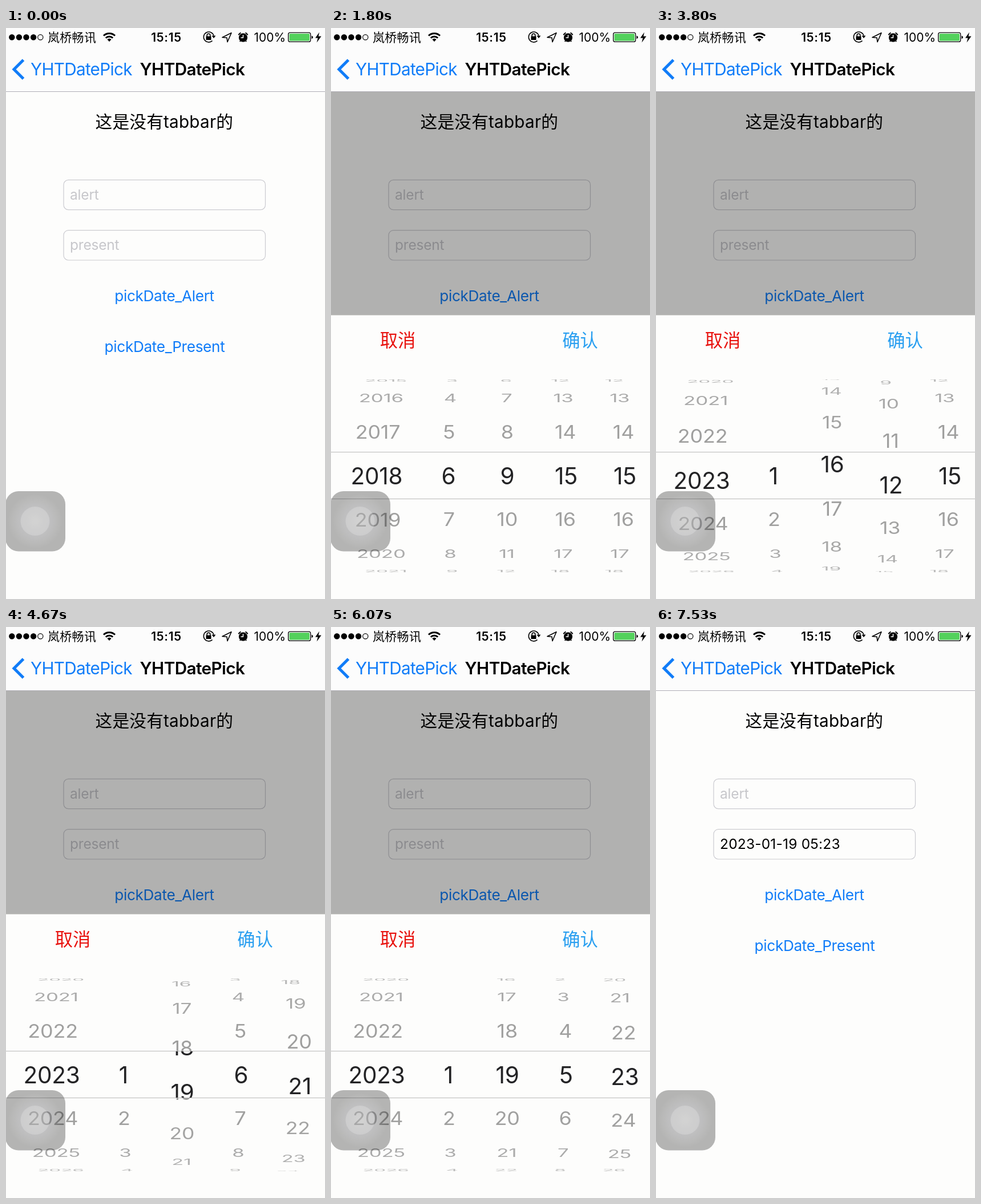
An HTML page for the animation above (7590 ms loop, 559 by 1001 pixels).

```html
<!DOCTYPE html>
<html lang="zh">
<head>
<meta charset="utf-8">
<title>Date picker</title>
<style>
  html, body { margin: 0; width: 100%; height: 100%; overflow: hidden; background: #fdfdfc; }
  svg { display: block; width: 100vw; height: 100vh; }
  text { font-family: Inter, "Noto Sans CJK SC", "Noto Sans CJK", sans-serif; white-space: pre; }
  .mid { text-anchor: middle; }
  .status { font-size: 21px; }
  .nav { font-size: 29.7px; letter-spacing: -.024em; }
  .title { font-weight: 600; letter-spacing: -.02em; }
  .field { font-size: 24.5px; letter-spacing: .008em; }
  .hint { fill: #c7c7cb; letter-spacing: -.008em; }
  .link { font-size: 26.2px; letter-spacing: -.013em; fill: #107cf8; }
  .act { font-size: 31.3px; }
  .box { fill: none; stroke: #cbcbd0; stroke-width: 1.2; }
  .row { text-anchor: middle; font-size: 40.5px; letter-spacing: -.005em; }
  .line { fill: none; stroke: #000; }
</style>
</head>
<body>
<svg viewBox="0 0 559 1001">
  <defs>
    <clipPath id="wheelClip"><path d="M0-172H559V-41H0ZM0 41H559V172H0Z"/></clipPath>
    <clipPath id="bandClip"><path d="M0-41H559V41H0Z"/></clipPath>
    <radialGradient id="glow">
      <stop offset="0" stop-color="#fff" stop-opacity=".26"/>
      <stop offset=".6" stop-color="#f4f4ff" stop-opacity=".16"/>
      <stop offset="1" stop-color="#fff" stop-opacity="0"/>
    </radialGradient>
  </defs>
  <rect width="559" height="1001" fill="#fdfdfc"/>

  <text x="156.5" y="175" font-size="29.7" letter-spacing=".2">这是没有tabbar的</text>
  <rect class="box" x="101" y="266.3" width="353.5" height="52.4" rx="8.5"/>
  <rect class="box" x="101" y="354.6" width="353.5" height="52.4" rx="8.5"/>
  <text class="field hint" x="112" y="301">alert</text>
  <text class="field hint" x="112" y="389" id="present">present</text>
  <text class="link mid" x="277.5" y="479">pickDate_Alert</text>
  <text class="link mid" x="278" y="568">pickDate_Present</text>

  <rect id="dim" y="112" width="559" height="889"/>

  <g id="panel">
    <rect width="559" height="498" fill="#fdfdfc"/>
    <text class="act mid" x="117" y="55.5" fill="#e8130f">取消</text>
    <text class="act mid" x="436.5" y="55.5" fill="#2a9ff0">确认</text>
    <g transform="translate(0 281.5)">
      <g id="rim" clip-path="url(#wheelClip)"></g>
      <g id="band" clip-path="url(#bandClip)"></g>
      <path d="M0-41.5H559M0 40.5H559" stroke="#b9b9b9"/>
    </g>
  </g>

  <rect width="559" height="111" fill="#fcfcfc"/>
  <path d="M0 111.5H559" stroke="#b0aeb6"/>
  <path d="M30.5 56L14 72.5L30.5 89" fill="none" stroke="#107cf8" stroke-width="5"/>
  <text class="nav" x="43" y="83" fill="#107cf8">YHTDatePick</text>
  <text class="nav title" x="234.5" y="83">YHTDatePick</text>

  <g id="signal"></g>
  <text class="status" x="73" y="24" letter-spacing=".3">岚桥畅讯</text>
  <g transform="translate(181 23)">
    <path class="line" stroke-width="3" d="M-10-9.5A14.5 14.5 0 0 1 10-9.5M-6.2-5.5A9 9 0 0 1 6.2-5.5"/>
    <path d="M0 1L-3.6-2.9A5 5 0 0 1 3.6-2.9Z"/>
  </g>
  <text class="status mid" x="281" y="24" font-weight="600" letter-spacing=".7">15:15</text>
  <g class="line" stroke-width="1.6">
    <path d="M364 13.5A9 9 0 1 0 361.5 22.4"/>
    <path d="M352.2 15V12.8A2.8 2.8 0 0 1 357.8 12.8V15"/>
    <path d="M379 16.5L395 8.5L388 24.5L387 17Z" stroke-linejoin="round"/>
  </g>
  <path d="M350.5 14.5H359.5V21H350.5ZM360.5 13.5H367.5L364 18Z"/>
  <circle cx="415.5" cy="16.8" r="7.6"/>
  <path class="line" d="M407.8 11.5L410.8 8.6M423.2 11.5L420.2 8.6" stroke-width="2" stroke-linecap="round"/>
  <path class="line" d="M411 22L409.8 24M420 22L421.2 24" stroke-width="1.6"/>
  <path d="M415.5 12V17H411.5" fill="none" stroke="#fff" stroke-width="1.5"/>
  <text class="status" x="434.5" y="24">100%</text>
  <rect class="line" x="494.7" y="8.2" width="39" height="16" rx="3" stroke-width="1.3"/>
  <rect x="496.5" y="10" width="35.4" height="12.4" rx="1.5" fill="#53d15c"/>
  <path d="M535.5 13.5Q538 14 538 16.2T535.5 19Z"/>
  <path d="M549 7.5L542 17.5H546.5L544.5 25.5L552.5 14.5H547.5Z"/>

  <rect x="-1" y="812" width="105" height="105.5" rx="23" fill="#000" fill-opacity=".29"/>
  <circle cx="51" cy="864.5" r="48" fill="url(#glow)"/>
  <circle cx="51" cy="864.5" r="25.5" fill="#fff" fill-opacity=".2"/>
</svg>
<script>
const LOOP = 7590, STEP = 27 * Math.PI / 180, RADIUS = 169, VANISH = 280, REACH = 4;
const OPEN = 479, CLOSE = 6330, SLIDE = 300, TOP = 503.5, HEIGHT = 497.5;
const $ = id => document.getElementById(id);

// Each wheel: centre x, value limits, and [time, value] stops.
const wheels = [
  { x: 80, min: 1900, max: 2100, stops: [[1300, 2017], [2730, 2021.33], [3800, 2022.9], [4150, 2023]] },
  { x: 206, min: 1, max: 12, stops: [[2780, 6], [3600, 1]] },
  { x: 309, min: 1, max: 31, stops: [[3200, 9], [3800, 16.25], [4670, 18.61], [5050, 19]] },
  { x: 412, min: 0, max: 23, stops: [[3350, 15], [3800, 11.8], [4550, 6], [5150, 6], [5700, 5]] },
  { x: 515, min: 0, max: 59, stops: [[4100, 15], [4670, 20.75], [6070, 22.96], [6200, 23]] }
];

function make(parent, tag, attrs) {
  const el = document.createElementNS("http://www.w3.org/2000/svg", tag);
  for (const key in attrs) el.setAttribute(key, attrs[key]);
  return parent.appendChild(el);
}

for (let i = 0; i < 5; i++) {
  make($("signal"), "circle", i < 4
    ? { cx: 10.3 + i * 12.6, cy: 16.3, r: 5.2 }
    : { cx: 60.3, cy: 16.3, r: 4.6, class: "line", "stroke-width": 1.2 });
}

for (const wheel of wheels) {
  wheel.rows = [];
  for (let k = -REACH; k <= REACH; k++) {
    wheel.rows.push({
      k,
      rim: make($("rim"), "text", { class: "row", y: 14.7 }),
      band: make($("band"), "text", { class: "row", y: 14.7, fill: "#232325" })
    });
  }
}

// Monotone cubic through the stops, flat at both ends.
function valueAt(stops, t) {
  const last = stops.length - 1;
  if (t <= stops[0][0]) return stops[0][1];
  if (t >= stops[last][0]) return stops[last][1];
  const slope = i => (stops[i + 1][1] - stops[i][1]) / (stops[i + 1][0] - stops[i][0]);
  const tangent = i => {
    if (i === 0 || i === last) return 0;
    const a = slope(i - 1), b = slope(i);
    return a * b > 0 ? 2 * a * b / (a + b) : 0;
  };
  const i = stops.findIndex(s => s[0] > t) - 1;
  const [t0, v0] = stops[i], [t1, v1] = stops[i + 1];
  const h = t1 - t0, u = (t - t0) / h, w = 1 - u;
  return v0 * (1 + 2 * u) * w * w + tangent(i) * h * u * w * w
    + v1 * u * u * (3 - 2 * u) - tangent(i + 1) * h * u * u * w;
}

// Ease-in-out with control points .42 and .58.
function ease(p) {
  if (p <= 0) return 0;
  if (p >= 1) return 1;
  let lo = 0, hi = 1;
  for (let i = 0; i < 20; i++) {
    const s = (lo + hi) / 2, w = 1 - s;
    if (1.26 * s * w * w + 1.74 * s * s * w + s * s * s < p) lo = s; else hi = s;
  }
  return lo * lo * (3 - 2 * lo);
}

function place(el, label, x, y, sx, sy, alpha) {
  el.textContent = label;
  el.setAttribute("transform", `translate(${x} ${y}) scale(${sx} ${sy})`);
  el.setAttribute("opacity", alpha);
}

function drawWheel(wheel, t) {
  const pos = valueAt(wheel.stops, t), base = Math.round(pos);
  for (const { k, rim, band } of wheel.rows) {
    const value = base + k, angle = (value - pos) * STEP, c = Math.cos(angle);
    const shown = value >= wheel.min && value <= wheel.max && c > 0.02;
    const label = shown ? value : "";
    const depth = 1 - 0.095 * (1 - c);
    const x = VANISH + (wheel.x - VANISH) * depth, y = RADIUS * Math.sin(angle);
    const size = 0.895 * depth;
    place(rim, label, x, y, size, size * c, 0.38 - 0.15 * (1 - c));
    place(band, label, x, y, depth, depth * c, 1);
  }
}

function draw(t) {
  const up = ease((t - OPEN) / SLIDE) - ease((t - CLOSE) / SLIDE);
  $("panel").setAttribute("transform", `translate(0 ${TOP + HEIGHT * (1 - up)})`);
  $("panel").setAttribute("visibility", up > 0 ? "visible" : "hidden");
  $("dim").setAttribute("opacity", 0.3 * up);
  const done = t >= CLOSE;
  $("present").textContent = done ? "2023-01-19 05:23" : "present";
  $("present").setAttribute("class", done ? "field" : "field hint");
  wheels.forEach(wheel => drawWheel(wheel, t));
}

const start = performance.now();
function tick() {
  draw((performance.now() - start) % LOOP);
  requestAnimationFrame(tick);
}
tick();
</script>
</body>
</html>
```
